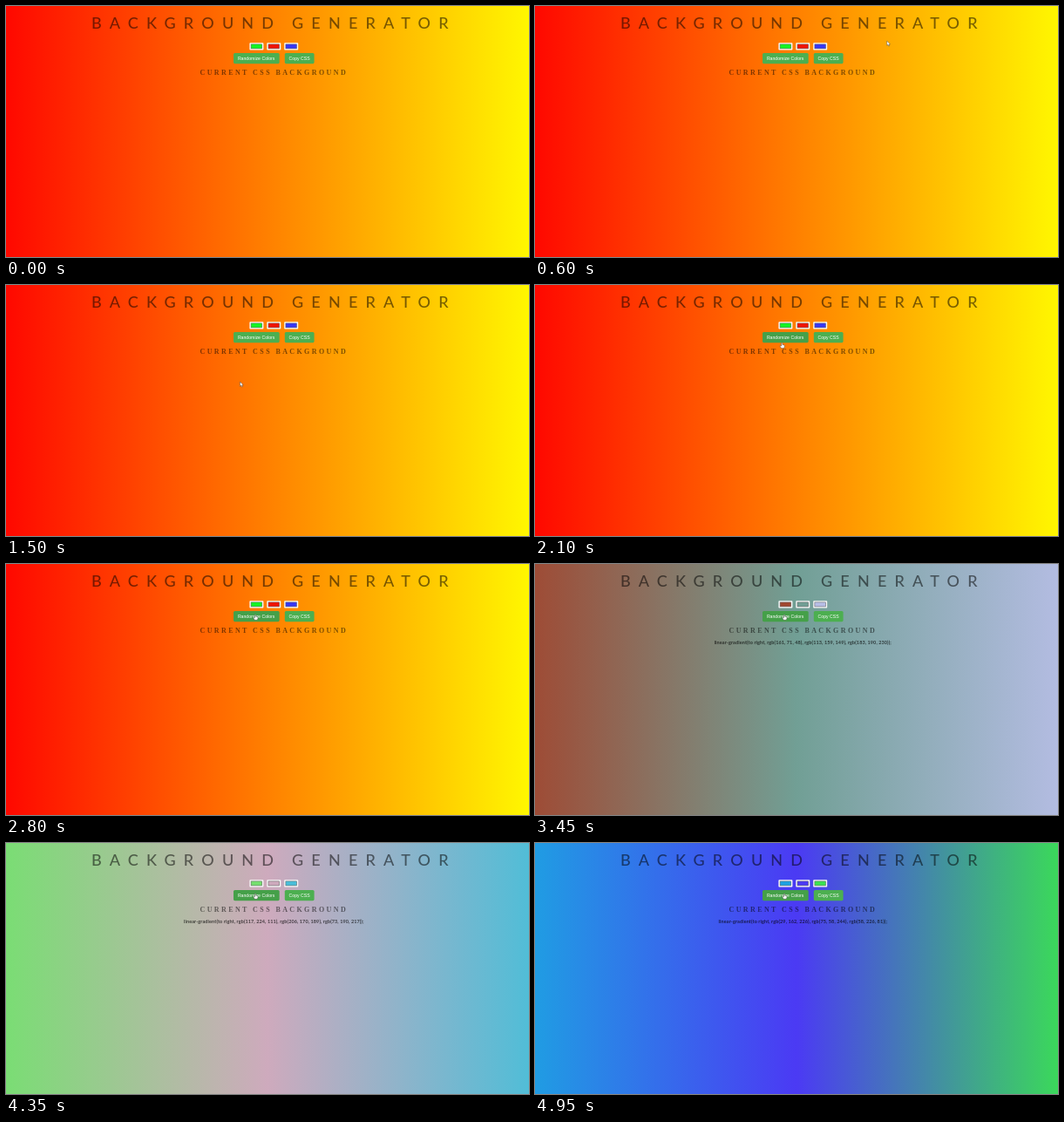
These frames come from a looping animation (600 px wide and 288 px high, 5000 ms). An HTML page:

```html
<!DOCTYPE html>
<html lang="en">
<head>
<meta charset="utf-8">
<title>Background Generator</title>
<style>
  html, body { margin: 0; width: 100%; height: 100%; overflow: hidden; }
  svg { display: block; width: 600px; height: 288px; }
  .title { font: 500 18px Lato, sans-serif; letter-spacing: 9.2px; fill: rgba(0, 0, 0, .53); }
  .sub { font: bold 8px "Liberation Serif", serif; letter-spacing: 2.4px; fill: rgba(0, 0, 0, .5); }
  .css { font: bold 5.5px Lato, sans-serif; letter-spacing: .1px; fill: rgba(0, 0, 0, .65); text-anchor: middle; }
  .label { font: 5.17px "Liberation Sans", sans-serif; fill: #fff; }
  .button { fill: #4caf50; }
  .button.hover { fill: #45a049; }
</style>
</head>
<body>
<svg viewBox="0 0 600 288">
  <defs>
    <linearGradient id="grad">
      <stop offset="0"/><stop offset=".5"/><stop offset="1"/>
    </linearGradient>
    <g id="chip">
      <rect width="16" height="8.2" rx=".8" fill="#f8f8f8"/>
      <rect x="1.7" y="1.6" width="12.6" height="5" fill="currentColor" stroke="#555" stroke-width=".5"/>
    </g>
  </defs>
  <rect width="600" height="288" fill="url(#grad)"/>
  <text class="title" x="98" y="26">BACKGROUND</text>
  <text class="title" x="328" y="26">GENERATOR</text>
  <use class="chip" href="#chip" x="279.4" y="42.3"/>
  <use class="chip" href="#chip" x="299.3" y="42.3"/>
  <use class="chip" href="#chip" x="319.2" y="42.3"/>
  <rect class="button" id="random" x="261" y="54" width="52.7" height="12.2" rx="1.6"/>
  <rect class="button" x="319.8" y="54" width="33.8" height="12.2" rx="1.6"/>
  <text class="label" x="265.9" y="61.9">Randomize Colors</text>
  <text class="label" x="324.6" y="61.9">Copy CSS</text>
  <text class="sub" x="222.5" y="79.2">CURRENT CSS BACKGROUND</text>
  <text class="css" id="css" x="307.3" y="92.2"></text>
  <g id="cursor" stroke="#333" stroke-width=".4" stroke-linejoin="round" fill="#fff">
    <path id="arrow" d="M0 0V5.2L1.2 4.1L2 6L2.9 5.6L2.1 3.8H3.7Z"/>
    <path id="hand" d="M-.6 .6Q0 -.4 .6 .6V2.4L3 3Q3.3 4.6 2.3 6.4H-.8L-2.4 3.8Q-2 3 -.6 4Z"/>
  </g>
</svg>
<script>
const LOOP = 5000, FIRST_CLICK = 3100, CLICK_GAP = 850;
const EDGE = .06; // how far the outer colours lean to the middle one

const START = { colors: ['#ff0000', '#ff8000', '#ffff00'], chips: ['#14f523', '#f01405', '#3737f5'] };
const THEMES = [
  ['#a14730', '#719f95', '#b7bee6'],
  ['#75e06f', '#ceaabd', '#49bed9'],
  ['#1da2e2', '#4b3af4', '#3ae251']
].map(colors => ({ colors, chips: colors }));

const ENTER = { t: 350, x: 440, y: -8 };
const PASS = { t: 600, x: 404, y: 40 };
const REST = { t: 1500, x: 268.5, y: 111 };
const BUTTON = { t: 2300, x: 286, y: 57.8 };

const $ = id => document.getElementById(id);
const all = s => [...document.querySelectorAll(s)];
const stops = all('stop'), chips = all('.chip');

const channels = hex => hex.match(/\w\w/g).map(h => parseInt(h, 16));
const rgb = c => `rgb(${c.join(', ')})`;
const lerp = (a, b, u) => a + (b - a) * u;
const mix = (a, b, u) => a.map((v, i) => Math.round(lerp(v, b[i], u)));

const linear = u => u;
const easeOut = u => Math.sin(u * Math.PI / 2);
const easeInOut = u => u * u * (3 - 2 * u);

function glide(a, b, t, ease) {
  const u = ease(Math.min(1, Math.max(0, (t - a.t) / (b.t - a.t))));
  return { x: lerp(a.x, b.x, u), y: lerp(a.y, b.y, u) };
}

function pointer(t) {
  if (t < PASS.t) return glide(ENTER, PASS, t, linear);
  if (t < REST.t) return glide(PASS, REST, t, easeOut);
  return glide(REST, BUTTON, t, easeInOut);
}

function drawTheme(t) {
  const clicks = Math.floor((t - FIRST_CLICK) / CLICK_GAP);
  const theme = THEMES[clicks] || START;
  const [left, mid, right] = theme.colors.map(channels);

  [mix(left, mid, EDGE), mid, mix(right, mid, EDGE)]
    .forEach((c, i) => stops[i].setAttribute('stop-color', rgb(c)));
  chips.forEach((chip, i) => chip.setAttribute('color', theme.chips[i]));
  $('css').textContent = theme === START ? ''
    : `linear-gradient(to right, ${[left, mid, right].map(rgb).join(', ')});`;
}

function drawCursor(t) {
  const { x, y } = pointer(t);
  const box = $('random').getBBox();
  const hover = x > box.x && x < box.x + box.width && y > box.y && y < box.y + box.height;
  $('random').classList.toggle('hover', hover);
  $('cursor').setAttribute('transform', `translate(${x} ${y})`);
  $('arrow').setAttribute('display', hover ? 'none' : 'inline');
  $('hand').setAttribute('display', hover ? 'inline' : 'none');
}

const began = performance.now();
function tick() {
  const t = (performance.now() - began) % LOOP;
  drawTheme(t);
  drawCursor(t);
  requestAnimationFrame(tick);
}
tick();
</script>
</body>
</html>
```
